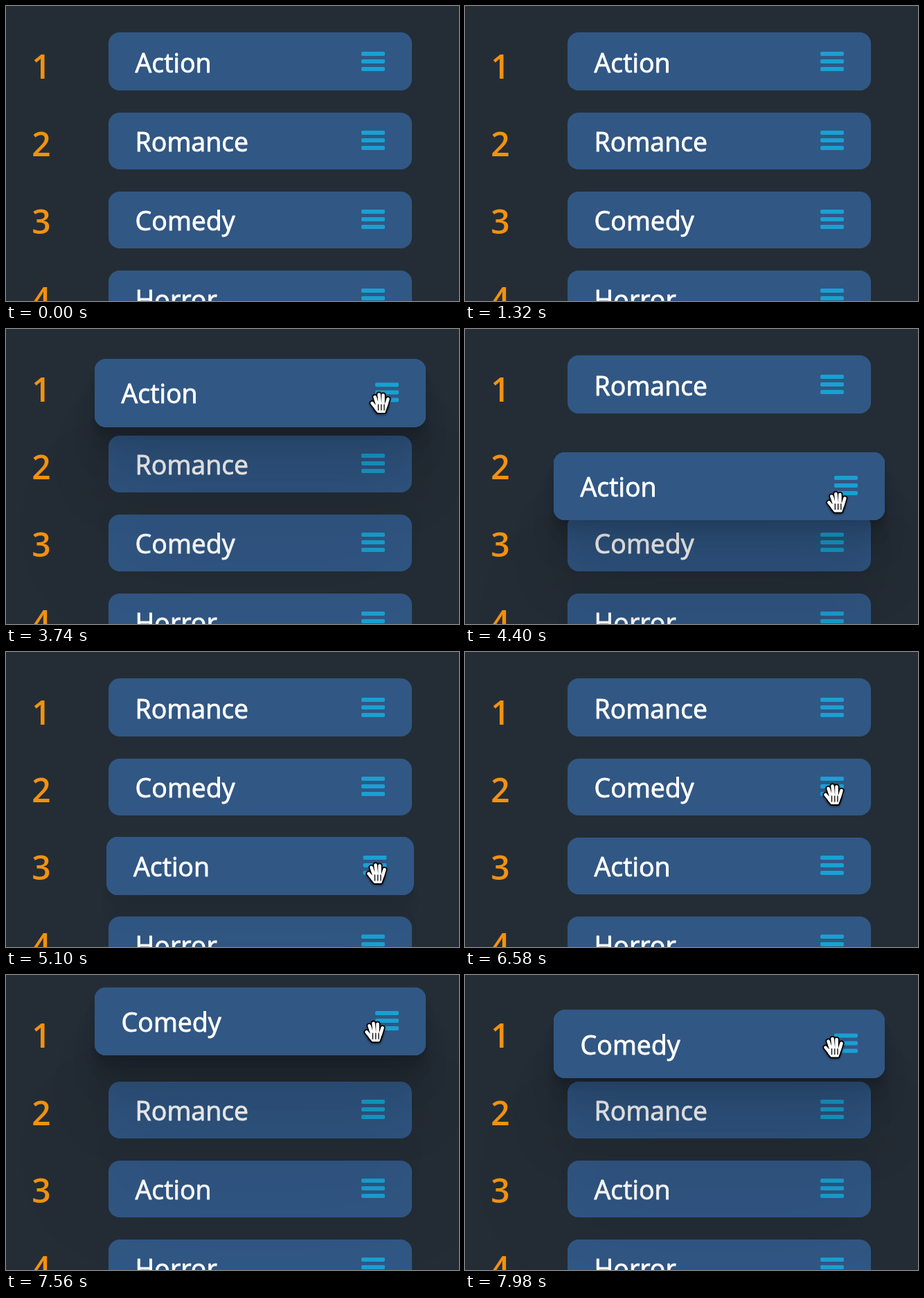
Animation of 654x426 px, one loop 8000 ms. Source, as an HTML page with a canvas:

```html
<!DOCTYPE html>
<html lang="en">
<head>
<meta charset="utf-8">
<title>Sortable genre list</title>
<style>
  html, body { margin: 0; width: 100%; height: 100%; overflow: hidden; background: #242d36; }
  canvas { display: block; }
</style>
</head>
<body>
<canvas id="stage" width="654" height="426"></canvas>
<script>
const LOOP = 8000, ROW = 114, LIFT_TIME = 220, SHIFT_TIME = 220;
const LAG = 60;    // the dragged card trails the hand by this many ms
const GRIP = 11;   // the hand holds a card this far below its centre
const REACH = 35;  // overlap past a card's centre that makes it give way
const ctx = document.getElementById('stage').getContext('2d');

const labels = ['Action', 'Romance', 'Comedy', 'Horror'];
const drags = [
  { label: 'Action', grab: 3400, drop: 4930 },
  { label: 'Comedy', grab: 6620, drop: Infinity }
];

// Hand waypoints: time, x, y
const waypoints = [
  [2100, 672, 128], [2480, 624, 160], [2600, 626, 167], [3060, 530, 70],
  [3380, 540, 92], [3740, 540, 107], [4370, 537, 244], [4780, 535, 320],
  [5200, 535, 320], [5740, 533, 219], [6100, 532, 206], [6640, 532, 206],
  [7120, 532, 108], [7460, 532, 77], [7880, 532, 113], [8000, 532, 104]
];

const rowY = row => 81 + ROW * row;

function ease(u) {
  u = Math.min(1, Math.max(0, u));
  return u * u * (3 - 2 * u);
}

// Smooth curve through one column of the waypoints that never overshoots them.
function handAt(t, column) {
  const last = waypoints.length - 1;
  const slope = i => (waypoints[i + 1][column] - waypoints[i][column])
    / (waypoints[i + 1][0] - waypoints[i][0]);
  const tangent = i => {
    if (i === 0 || i === last) return 0;
    const a = slope(i - 1), b = slope(i);
    return a * b <= 0 ? 0 : 2 * a * b / (a + b);
  };
  if (t <= waypoints[0][0]) return waypoints[0][column];
  const i = waypoints.findIndex(point => point[0] > t) - 1;
  const d = waypoints[i + 1][0] - waypoints[i][0];
  const u = (t - waypoints[i][0]) / d, w = 1 - u;
  return waypoints[i][column] * w * w * (1 + 2 * u)
    + waypoints[i + 1][column] * u * u * (3 - 2 * u)
    + d * u * w * (w * tangent(i) - u * tangent(i + 1));
}

const heldY = t => handAt(t - LAG, 2) - GRIP;

// Follow each drag once and note when neighbours trade rows with the held card.
function findShifts() {
  const order = [...labels], shifts = [];
  for (const { label, grab, drop } of drags) {
    for (let at = grab; at < Math.min(drop, LOOP); at += 10) {
      const row = order.indexOf(label);
      for (const step of [-1, 1]) {
        const other = order[row + step];
        if (other && (heldY(at) - rowY(row + step)) * step > -REACH) {
          order[row] = other;
          order[row + step] = label;
          shifts.push({ label, at, step }, { label: other, at, step: -step });
          break;
        }
      }
    }
  }
  return shifts;
}
const shifts = findShifts();

function cardAt(label, row, t) {
  const moved = shifts.filter(shift => shift.label === label)
    .reduce((sum, { at, step }) => sum + step * ease((t - at) / SHIFT_TIME), 0);
  const rest = rowY(row + moved);
  const drag = drags.find(item => item.label === label);
  const lift = drag
    ? ease((t - drag.grab) / LIFT_TIME) - ease((t - drag.drop) / LIFT_TIME) : 0;
  return { label, lift, y: rest + (heldY(t) - rest) * lift };
}

function fillRound(x, y, w, h, r) {
  ctx.beginPath();
  ctx.roundRect(x, y, w, h, r);
  ctx.fill();
}

function drawCard({ label, y, lift }) {
  const grow = 20 * lift, half = 41 + 8 * lift;
  // the top slot is two pixels taller
  const extra = 2 * (1 - lift) * Math.max(0, 1 - Math.abs(y - rowY(0)) / 20);
  const body = () => fillRound(148 - grow, y - half - extra, 438 + 2 * grow, 2 * half + extra, 16);

  ctx.fillStyle = '#315784';
  if (lift > 0) {
    ctx.save();
    for (let i = 5; i >= 0; i--) {
      const offset = 6 * 2 ** i;
      ctx.shadowColor = `rgba(0,0,0,${(0.034 + 0.016 * i) * lift})`;
      ctx.shadowOffsetY = offset;
      ctx.shadowBlur = 0.75 * offset;
      body();
    }
    ctx.restore();
  }
  body();

  ctx.fillStyle = ctx.strokeStyle = '#fff';
  ctx.font = '37.5px "Open Sans", "Noto Sans", sans-serif';
  ctx.textAlign = 'left';
  ctx.lineWidth = 0.9;
  ctx.lineJoin = 'round';
  ctx.fillText(label, 186.6 - grow, y + 15);
  ctx.strokeText(label, 186.6 - grow, y + 15);

  ctx.fillStyle = '#1aa0d2';
  for (let i = 0; i < 3; i++) fillRound(513 + grow, y - 15 + 11 * i, 34, 6, 2);
}

const fingers = new Path2D(
  'M-11.5 0L-5 8M-7.5-9L-3.5 3M-1.5-12.5L0 2M4.5-11.5L4.5 3M11.5-6L8.5 4');
const palm = new Path2D('M-6 3L9 2L9 6L6.5 13L-3 13L-7 8Z');
const creases = new Path2D('M-2.5 2V10M1.8 2V10M6 2V10');

function drawHand(x, y) {
  const layer = (color, finger, edge) => {
    ctx.strokeStyle = ctx.fillStyle = color;
    ctx.lineWidth = finger;
    ctx.stroke(fingers);
    ctx.lineWidth = edge;
    ctx.stroke(palm);
    ctx.fill(palm);
  };
  ctx.save();
  ctx.translate(x, y);
  ctx.lineCap = ctx.lineJoin = 'round';
  ctx.shadowColor = 'rgba(0,0,0,.4)';
  ctx.shadowOffsetY = 1.5;
  ctx.shadowBlur = 3;
  layer('#000', 8, 6);
  ctx.shadowColor = 'transparent';
  layer('#fff', 4.6, 2);
  ctx.strokeStyle = '#000';
  ctx.lineWidth = 1.3;
  ctx.stroke(creases);
  ctx.restore();
}

function draw() {
  const t = performance.now() % LOOP;
  ctx.fillStyle = '#242d36';
  ctx.fillRect(0, 0, 654, 426);

  ctx.fillStyle = '#f3920f';
  ctx.font = '600 48px "Open Sans", "Noto Sans", sans-serif';
  ctx.textAlign = 'center';
  labels.forEach((_, i) => ctx.fillText(i + 1, 51, 104.5 + 112 * i));

  labels
    .map((label, row) => cardAt(label, row, t))
    .sort((a, b) => a.lift - b.lift)
    .forEach(drawCard);

  drawHand(handAt(t, 1), handAt(t, 2));
  requestAnimationFrame(draw);
}

draw();
</script>
</body>
</html>
```
